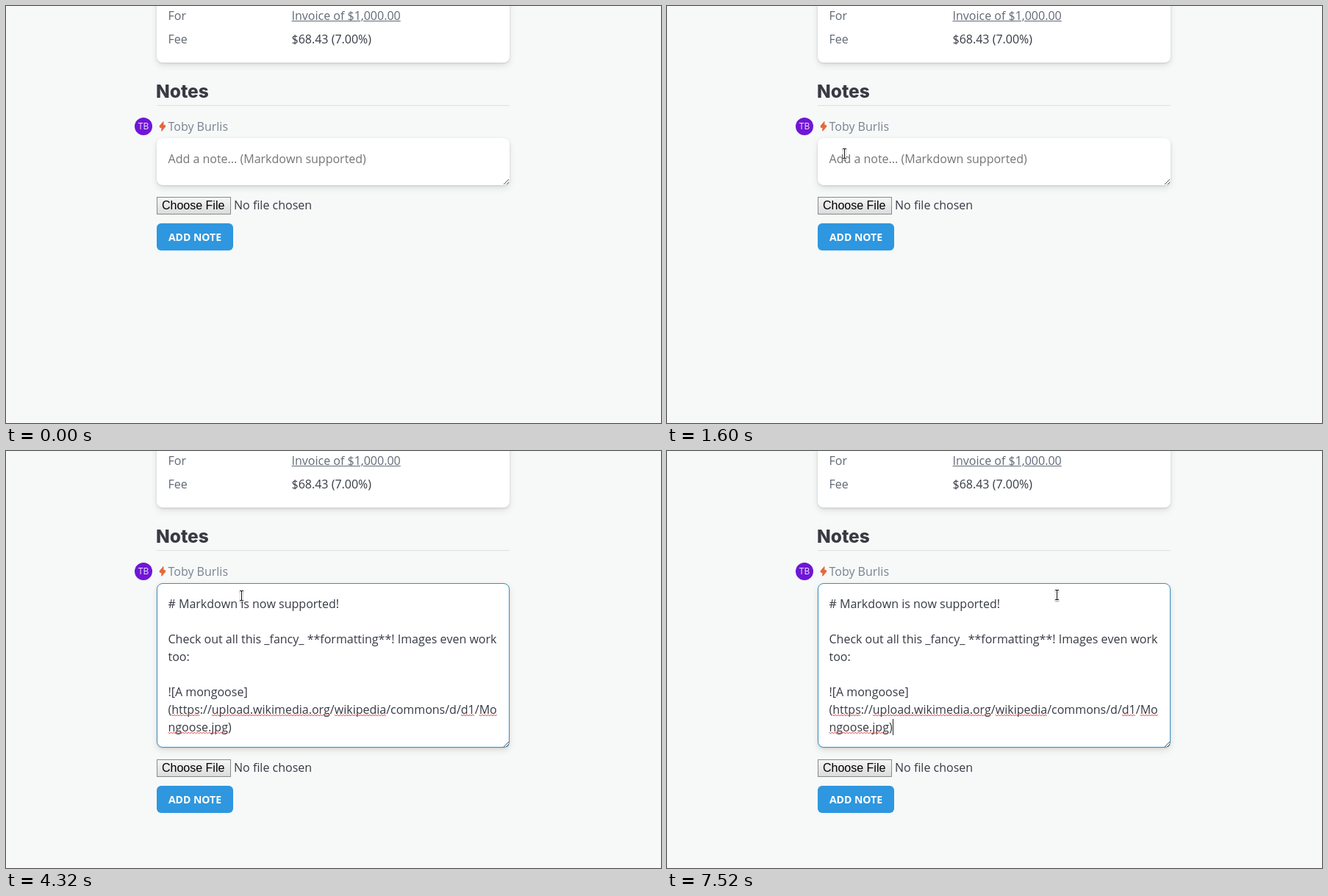
Recreate the animation shown at these times as an HTML page with a canvas. Size 891 px wide and 568 px high, loop 8000 ms.

```html
<!DOCTYPE html>
<html lang="en">
<head>
<meta charset="utf-8">
<title>Notes</title>
<style>
  html, body { margin: 0; width: 100%; height: 100%; overflow: hidden; background: #f7f9f8; }
  body { font: 16px/24px "Open Sans", sans-serif; color: #363a44; }
  #stage { position: relative; width: 891px; height: 568px; overflow: hidden; }
  #stage div, canvas { position: absolute; box-sizing: border-box; white-space: pre; }
  canvas { left: 0; top: 0; }
  .card { left: 205px; width: 480px; background: #fff; border-radius: 8px;
    box-shadow: 0 1px 3px rgba(0,0,0,.12), 0 4px 10px rgba(0,0,0,.1); }
  .label { left: 220.5px; color: #606975; }
  .value { left: 388.5px; }
  .link { color: #606975; text-decoration: underline; }
  #title { left: 204px; top: 101px; font: 800 24.5px/30px Inter, sans-serif; color: #383b44; }
  #rule { left: 205px; top: 135px; width: 480px; height: 1px; background: #dbdfe2; }
  #avatar { left: 175px; top: 152px; width: 24px; height: 24px; border-radius: 50%;
    background: #7016d6; color: #eee2fa; font-size: 12px; text-align: center; }
  #name { left: 220.5px; top: 152px; color: #768391; }
  #note { top: 180px; padding: 16px 15.5px; border: 0 solid #3c8fc2; font-kerning: none; }
  #note.focus { border-width: 1px; padding: 15px 14.5px; }
  #note.empty { color: #757575; }
  #file { left: 205px; top: 260px; width: 101px; height: 24px; padding-left: 6px; border: 1px solid #8a8a8a;
    background: linear-gradient(#f5f5f5, #dcdcdc); color: #000;
    font: 16px/21px "Liberation Sans", Arial, sans-serif; }
  #chosen { left: 310px; top: 259px; font-kerning: none; }
  #add { left: 205px; top: 296px; width: 104px; height: 37px; border-radius: 6px;
    background: #2e97df; color: #fff; font-weight: 700; font-size: 14px; line-height: 37px; text-align: center; }
  #tip { left: 171px; top: 124px; width: 136px; height: 28px; border-radius: 4px; background: #2b2e34;
    color: #fff; font-size: 14px; line-height: 28px; text-align: center; box-shadow: 0 1px 4px rgba(0,0,0,.3); }
</style>
</head>
<body>
<div id="stage">
  <div class="card" style="top:-40px;height:117px"></div>
  <div class="label" style="top:1px">For</div>
  <div class="value link" style="top:1px">Invoice of $1,000.00</div>
  <div class="label" style="top:33px">Fee</div>
  <div class="value" style="top:33px">$68.43 (7.00%)</div>
  <div id="title">Notes</div>
  <div id="rule"></div>
  <div id="avatar">TB</div>
  <div id="name">Toby Burlis</div>
  <div id="note" class="card"></div>
  <div id="form" style="left:0;top:0">
    <div id="file">Choose File</div>
    <div id="chosen">No file chosen</div>
    <div id="add">ADD NOTE</div>
  </div>
  <div id="tip">Toby is an admin</div>
  <canvas id="ink" width="891" height="568"></canvas>
</div>
<script>
const LOOP = 8000, STEP = 80, BLINK = 480;
const ENTER = 560, FOCUS = 1920, GROW = 2480, PASTE = 2720;
const PLACEHOLDER = 'Add a note... (Markdown supported)';
const LINES = [
  '# Markdown is now supported!', '',
  'Check out all this _fancy_ **formatting**! Images even work', 'too:', '',
  '![A mongoose]',
  '(https://upload.wikimedia.org/wikipedia/commons/d/d1/Mo',
  'ngoose.jpg)'
];
const URL_ROW = 6;
const MISSPELT = /\b(?!commons)\w{2,}(\.\w+)*/g;

const $ = id => document.getElementById(id);
const note = $('note'), form = $('form'), tip = $('tip');
const ctx = $('ink').getContext('2d');

const clamp = v => Math.min(1, Math.max(0, v));
const smooth = u => u * u * (3 - 2 * u);
const mix = (a, b, u) => a + (b - a) * u;

// Straight move from a to b, lifted in the middle by `lift` pixels
function glide(a, b, u, lift = 0) {
  return { x: mix(a.x, b.x, u), y: mix(a.y, b.y, u) - 4 * lift * u * (1 - u) };
}

const EDGE = { x: 149, y: 8 }, BADGE = { x: 227, y: 177 };
const FIELD = { x: 246, y: 209 }, REST = { x: 530, y: 196 };

function pointer(t) {
  if (t <= 1360) return glide(EDGE, BADGE, (t - ENTER) / 800);
  if (t <= 4040) return glide(BADGE, FIELD, clamp((t - 1360) / 320));
  return glide(FIELD, REST, smooth(clamp((t - 4040) / 840)), 11);
}

const tipOpacity = t => Math.min(clamp((t - 1040) / 160), clamp((1520 - t) / 250));

function caretOn(t) {
  const since = t >= PASTE ? t - PASTE : t - FOCUS;
  return since >= 0 && Math.floor(since / BLINK) % 2 === 0;
}

function poly(points, close) {
  ctx.beginPath();
  points.forEach(([x, y]) => ctx.lineTo(x, y));
  if (close) ctx.closePath();
}

function stroke(color, width) {
  ctx.strokeStyle = color;
  ctx.lineWidth = width;
  ctx.stroke();
}

function softShadow() {
  ctx.shadowColor = 'rgba(0,0,0,.45)';
  ctx.shadowBlur = 2;
  ctx.shadowOffsetY = 1;
}

function drawBolt() {
  poly([[214, 157.5], [209, 163.5], [209.5, 165.5], [212, 165.8],
    [211.7, 170.3], [216.8, 164.3], [216.3, 162.4], [213.9, 162.2]], true);
  ctx.lineJoin = 'round';
  ctx.fillStyle = '#e5673a';
  ctx.fill();
  stroke('#e5673a', 1);
}

function drawGrip(bottom) {
  for (const size of [7, 3]) {
    poly([[684 - size, bottom - 1], [684, bottom - 1 - size]]);
    stroke('#555', 1);
  }
}

function drawSquiggles() {
  ctx.font = '16px "Open Sans", sans-serif';
  ctx.fontKerning = 'none';
  LINES.slice(URL_ROW).forEach((line, i) => {
    const y = 216 + (URL_ROW + i) * 24;
    for (const match of line.matchAll(MISSPELT)) {
      const left = 220.5 + ctx.measureText(line.slice(0, match.index)).width;
      const right = left + ctx.measureText(match[0]).width;
      const points = [];
      for (let x = left; x <= right; x += 2) points.push([x, y + (points.length % 2 ? 1 : -1)]);
      poly(points);
      stroke('#e03c3c', 1);
    }
  });
}

function drawArrow({ x, y }) {
  ctx.save();
  ctx.translate(x, y);
  poly([[0, 0], [0, 14], [3.2, 11.2], [5.6, 16.5], [8, 15.4], [5.6, 10.4], [9.6, 10]], true);
  softShadow();
  stroke('#fff', 2);
  ctx.shadowColor = 'transparent';
  ctx.fillStyle = '#111';
  ctx.fill();
  ctx.restore();
}

function drawBeam({ x, y }) {
  ctx.save();
  ctx.translate(Math.round(x) + .5, Math.round(y) + .5);
  ctx.beginPath();
  for (const end of [-7, 6]) {
    ctx.moveTo(-2.5, end);
    ctx.lineTo(2.5, end);
  }
  ctx.moveTo(0, -7);
  ctx.lineTo(0, 6);
  softShadow();
  stroke('#fff', 3);
  ctx.shadowColor = 'transparent';
  stroke('#111', 1);
  ctx.restore();
}

function render(time) {
  const t = Math.floor(time % LOOP / STEP) * STEP;
  const pasted = t >= PASTE;
  const grown = pasted ? 160 : t >= GROW ? 16 : 0;

  note.textContent = pasted ? LINES.join('\n') : PLACEHOLDER;
  note.className = 'card' + (t >= FOCUS ? ' focus' : '') + (pasted ? '' : ' empty');
  note.style.height = 64 + grown + 'px';
  form.style.top = grown + 'px';
  tip.style.opacity = tipOpacity(t);

  ctx.clearRect(0, 0, 891, 568);
  drawBolt();
  drawGrip(244 + grown);
  if (pasted) drawSquiggles();
  if (caretOn(t)) {
    ctx.fillStyle = '#222';
    if (pasted) ctx.fillRect(307, 365, 1, 22);
    else ctx.fillRect(221, 197, 1, 22);
  }
  if (t >= ENTER) {
    const spot = pointer(t);
    (spot.y > 180 ? drawBeam : drawArrow)(spot);
  }
}

const start = performance.now();
function tick() {
  render(performance.now() - start);
  requestAnimationFrame(tick);
}
tick();
</script>
</body>
</html>
```
